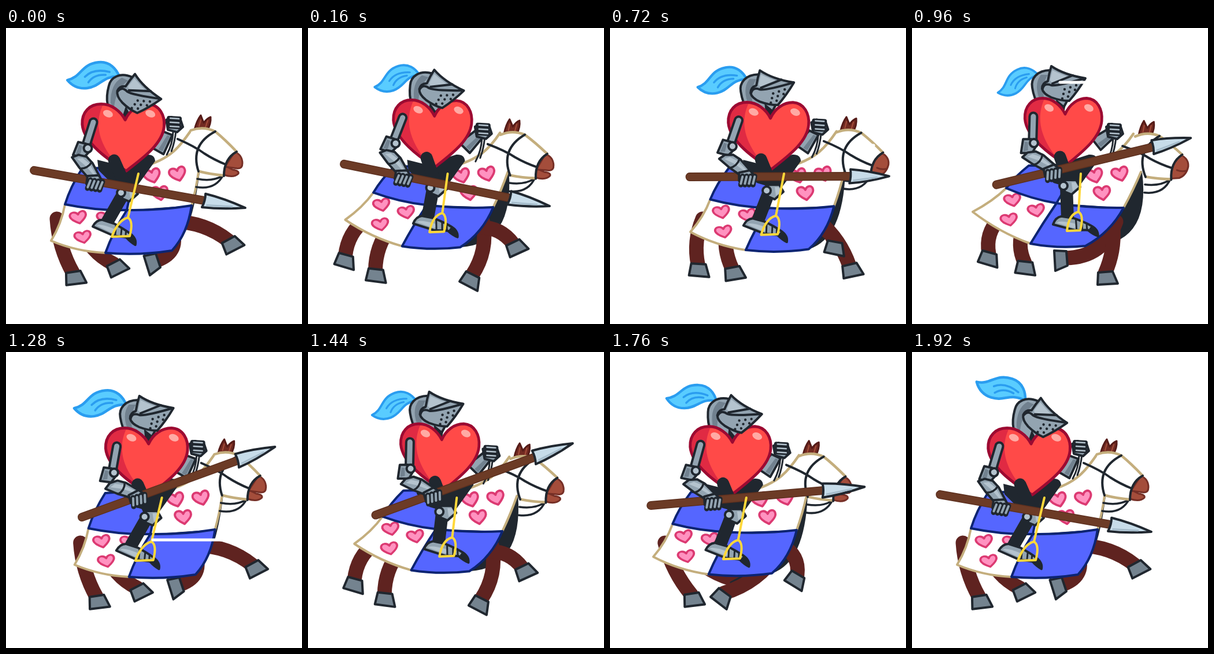
Recreate the animation shown at these times as an HTML page with a canvas. Size 512 by 512 pixels, loop 2 s.

```html
<!DOCTYPE html>
<html lang="en">
<head>
<meta charset="utf-8">
<title>Heart knight</title>
<style>
html, body { margin: 0; width: 100%; height: 100%; overflow: hidden; background: #fff; }
canvas { display: block; width: 100vw; height: 100vh; }
</style>
</head>
<body>
<canvas id="stage" width="512" height="512"></canvas>
<script>
const ctx = document.getElementById('stage').getContext('2d');
const STEP = 80, FRAMES = 25, STRIDE = 8;
const INK = '#20272f', STEEL = '#93a4b1', PALE = '#b4c3ce', SHADE = '#71818f';
const TAN = '#c4ae7d', BLUE = '#5566ff', NAVY = '#0c2472', BROWN = '#5f2320', HOOF = '#74838f';
const FACE = '#a44d3b', FACE_EDGE = '#762f26', GOLD = '#ffd83a';
const HEART = 'M0 0C8 -18 24 -28 40 -28C60 -27 70 -8 68 12C65 44 27 70 2 90' +
  'C-27 72 -72 42 -75 8C-76 -14 -62 -28 -42 -28C-24 -28 -8 -16 0 0Z';

const rad = d => d * Math.PI / 180;
const ramp = (a, b, t) => Math.min(1, Math.max(0, (t - a) / (b - a)));
const smooth = (a, b, t) => { const u = ramp(a, b, t); return u * u * (3 - 2 * u); };
const soft = (a, b, t) => (ramp(a, b, t) + smooth(a, b, t)) / 2;

// ---- motion: everything follows the stride, one lurch forward and the lance going up
function poseAt(t) {
  const w = 2 * Math.PI * t / STRIDE, c = Math.cos(w), s = Math.sin(w);
  const q = c - .45 * s;
  const lurch = Math.exp(-(((t - 5) / 2.2) ** 2));
  const lift = smooth(5, 15, t) - smooth(20, 24, t);
  const p = {
    t, c, s, q, lurch, lift,
    twice: Math.cos(2 * w) - Math.sin(2 * w),
    drift: 72 * (soft(0, 9, t) - soft(9.5, 24, t)),
    nod: 1 - smooth(0, 5, t) + smooth(20, 24, t),
    openMouth: t < 3 || t > 14
  };
  p.torso = { x: 204 + 2 * q + 20 * lurch, y: 154 + 5 * q + 5 * lurch };
  p.shoulder = { x: p.torso.x - 55, y: p.torso.y + 4 - 9 * lurch };
  p.hand = { x: 153 + 33 * lift - 10 * lurch, y: 262 + 3 * q - 14 * lift - 29 * lurch };
  p.elbow = joint(p.shoulder, p.hand, 46, 58);
  p.tilt = rad(10 - 30 * lift + 10 * lurch);
  p.helm = {
    x: 212 + 6 * q + 24 * lurch + 26 * p.nod,
    y: 82 + 5 * q + 10 * lurch + 14 * p.nod,
    turn: rad(24 * p.nod)
  };
  return p;
}
const wave = (p, a, b, d, k = 0) => a + b * p.c + d * p.s + k * p.twice;

// middle joint of two bones, bent to the left of a -> b
function joint(a, b, l1, l2) {
  const dx = b.x - a.x, dy = b.y - a.y, d = Math.hypot(dx, dy);
  const u = (l1 * l1 - l2 * l2 + d * d) / (2 * d), h = Math.sqrt(Math.max(0, l1 * l1 - u * u));
  return { x: a.x + (dx * u - dy * h) / d, y: a.y + (dy * u + dx * h) / d };
}

// ---- drawing helpers
function paint(fill, stroke, width = 4) {
  if (fill) { ctx.fillStyle = fill; ctx.fill(); }
  if (stroke) { ctx.strokeStyle = stroke; ctx.lineWidth = width; ctx.stroke(); }
}
function poly(p, fill, stroke, width) {
  ctx.beginPath();
  for (let i = 0; i < p.length; i += 2) ctx.lineTo(p[i], p[i + 1]);
  ctx.closePath();
  paint(fill, stroke, width);
}
function line(p, color, width) {
  ctx.beginPath();
  ctx.moveTo(p[0], p[1]);
  if (p.length === 4) ctx.lineTo(p[2], p[3]);
  else if (p.length === 6) ctx.quadraticCurveTo(...p.slice(2));
  else ctx.bezierCurveTo(...p.slice(2));
  paint(null, color, width);
}
function dot(x, y, r, fill, stroke, width) {
  ctx.beginPath();
  ctx.arc(x, y, r, 0, 7);
  paint(fill, stroke, width);
}
function shape(d, fill, stroke, width = 4) {
  const p = new Path2D(d);
  if (fill) { ctx.fillStyle = fill; ctx.fill(p); }
  if (stroke) { ctx.strokeStyle = stroke; ctx.lineWidth = width; ctx.stroke(p); }
}
function at(x, y, turn, draw) {
  ctx.save();
  ctx.translate(x, y);
  ctx.rotate(turn);
  draw();
  ctx.restore();
}
// outline through corners; bow[i] is added to the middle of the side that leaves corner i
function patch(corners, bows, fill, stroke, open = 0) {
  const n = corners.length;
  ctx.beginPath();
  ctx.moveTo(...corners[0]);
  for (let i = 0; i < n - open; i++) {
    const a = corners[i], b = corners[(i + 1) % n], [u, v] = bows[i] || [0, 0];
    ctx.quadraticCurveTo((a[0] + b[0]) / 2 + u, (a[1] + b[1]) / 2 + v, ...b);
  }
  paint(fill, stroke);
}

// ---- horse
function leg(rx, ry, x, y, turn, side) {
  const dx = x - rx, dy = y - ry, d = Math.hypot(dx, dy);
  const bend = side * (10 + .3 * Math.abs(turn));
  line([rx, ry, (rx + x) / 2 + dy / d * bend, (ry + y) / 2 - dx / d * bend, x, y], BROWN, 25);
  at(x, y, rad(turn), () => poly([-12, -1, 13, -3, 22, 18, -13, 20], HOOF, INK));
}
function legs(p) {
  leg(130, 345, wave(p, 159, 27, -55), wave(p, 407, 1, 12), wave(p, -6, -17, 17), -1);
  leg(88, 330, wave(p, 93, 23, -41), wave(p, 407, 17, -13), wave(p, 8, -12, 12), -1);
  leg(290, 335, wave(p, 294, 91, -23), wave(p, 395, -15, 21, -12), wave(p, 33, -57, -2), 1);
  leg(285, 345, wave(p, 266, -5, 76), wave(p, 404, -11, -22, 9), wave(p, 24, 38, -31, 14), 1);
}

function spot(x, y, turn, sy) {
  at(x, y, rad(turn), () => {
    ctx.scale(.195, .195 * sy);
    ctx.translate(3, -31);
    shape(HEART, '#ff92c0', '#dc3a72', 20);
  });
}

function body(p) {
  const { q } = p, sway = (x, y, u, v) => [x + u * q, y + v * q];
  const jaw = sway(333, 249, 0, 0), front = sway(312, 309, 9, -2);
  const frontLow = sway(262, 381, 25, 4), midLow = sway(157, 381, 15, 8);
  const rearLow = sway(60, 343, 18, 25), rearMid = sway(101, 291, 1, 14);
  const rump = sway(135, 241, -4, 3), core = sway(198, 309, 11, 6);
  const chest = sway(335, 367, -15, -12), poll = [320 - 2 * p.lurch, 180 - 3 * q];

  ctx.beginPath();
  ctx.moveTo(...jaw);
  ctx.quadraticCurveTo(...chest, frontLow[0], frontLow[1] - 2);
  ctx.lineTo(...core);
  paint(INK, INK);
  legs(p);

  const neck = [285, 228, 303, 205 - 3 * q, ...poll];
  ctx.beginPath();
  ctx.moveTo(...rump);
  ctx.lineTo(245, 237);
  ctx.bezierCurveTo(...neck);
  for (const v of [[poll[0] + 30, poll[1] + 30], jaw, front, core]) ctx.lineTo(...v);
  paint('#fff');
  line([235, 240, ...neck], TAN, 4.5);
  patch([jaw, front], [[2, 0]], null, TAN, 1);

  const seam = [(core[0] - midLow[0]) / 2 - 24, 0], hem = [-4, 8], tail = [6, 2];
  patch([core, midLow, rearLow, rearMid], [seam, hem, tail], '#fff');
  patch([midLow, rearLow, rearMid], [hem, tail], null, TAN, 1);
  spot(118 + 7 * q, 313 + 15 * q, -10, .88);
  spot(162 + 10 * q, 322 + 6 * q, -10, .88);
  spot(119 + 14 * q, 347 + 15 * q, -10, .85);

  patch([rearMid, rump, [225, 238], core], [[-5, 0], , , [0, 6]], BLUE, NAVY);
  patch([core, front, frontLow, midLow], [[0, 5], [10, 10], [0, 7], [-seam[0] - 24 + core[0] - midLow[0] - seam[0] * -1 - (core[0] - midLow[0]) + (core[0] - midLow[0]) / 2, 0]], BLUE, NAVY);
  spot(253, 256, -14, 1);
  spot(297, 253, -14, 1);
  spot(266, 286, -6, 1);
}

function face(p) {
  at(374 - 2 * p.q - 11 * p.lurch, 195.5 - 3.5 * p.q, rad(2 * p.q - 2), () => {
    ctx.translate(-372, -192);
    shape('M326 176Q330 160 337 151L342 164Q348 156 354 154Q355 166 348 177Z', '#722b22', '#551b18', 3);
    shape('M334 170L337 159M345 172L349 160', null, FACE, 2);
    shape('M374 256Q357 266 331 261M376 254Q362 281 329 275', null, INK, 3.5);
    if (p.openMouth) {
      shape('M378 238L392 245Q404 247 402 252Q394 260 377 254Z', FACE, FACE_EDGE, 3);
      shape('M396 214Q409 220 409 234Q409 243 401 243L379 240Z', FACE, FACE_EDGE, 3);
    } else {
      shape('M396 214Q410 222 408 235Q404 250 391 254L376 254L380 230Z', FACE, FACE_EDGE, 3);
      shape('M405 242Q396 244 388 240', null, FACE_EDGE, 3);
    }
    shape('M320 177Q341 169 362 179Q379 193 399 214Q380 226 376 256Q354 252 334 248L328 225Z', '#fff');
    shape('M320 177Q341 169 362 179Q379 193 399 214M376 255Q354 253 334 248', null, TAN, 4.5);
    shape('M362 179Q318 202 333 248M399 214Q377 226 377 256M297 192Q327 205 343 217Q360 228 380 236', null, INK, 4);
  });
}

// ---- rider
function plume(p) {
  const size = 83 + 7 * p.q;
  const turn = rad(10 * p.q - 14 + 18 * p.lurch + 25 * smooth(20, 24, p.t));
  at(-51, 4, turn - p.helm.turn, () => {
    ctx.scale(size / 100, size / 100);
    ctx.beginPath();
    ctx.moveTo(0, 0);
    ctx.bezierCurveTo(-4, -14, -16, -31, -38, -30);
    ctx.bezierCurveTo(-72, -29, -72, -4, -100, 0);
    ctx.bezierCurveTo(-92, 11, -80, 19, -63, 18);
    ctx.bezierCurveTo(-36, 16, -32, -4, 0, 0);
    paint('#59ccff', '#2a9df0', 5);
    line([-18, -10, -48, -20, -66, -4], '#2a9df0', 4);
    line([-26, -5, -48, -8, -60, 7], '#2a9df0', 4);
  });
}
// helmet parts are drawn around the middle of the visor
function inHelm(p, draw) {
  at(p.helm.x, p.helm.y, p.helm.turn, draw);
}
function dome() {
  shape('M-30 -4C-53 -4 -64 11 -61 26Q-58 45 -50 56L-13 72L0 48Z', STEEL, INK);
  shape('M-46 4Q-60 22 -46 52L-37 58Q-48 26 -34 4Z', SHADE);
  shape('M-20 46L-4 59L-6 72L-18 64Z', INK);
}
function visor() {
  shape('M-28 -11Q-32 2 -34 15Q-44 18 -44 28Q-42 37 -28 43Q-12 49 3 49Q18 32 31 10Q-6 4 -28 -11Z', STEEL, INK);
  shape('M-26 -4Q-12 3 0 7L-24 18Q-30 16 -30 13Z', PALE);
  shape('M-43 28Q-40 17 -28 22Q-18 24 30 10M-26 19L9 5', null, INK, 4);
  for (let i = 0; i < 8; i++) {
    const col = i % 3, row = Math.floor(i / 3);
    dot(-5 + col * 10 - row * 2, 29 - col * 3.5 + row * 8, 2.2, INK);
  }
}

function breast(p) {
  at(p.torso.x, p.torso.y, rad(5 * p.lurch), () => {
    ctx.scale(.96 + .03 * p.q, .98);
    ctx.save();
    ctx.clip(new Path2D(HEART));
    ctx.fillStyle = '#e02a43';
    ctx.fillRect(-90, -40, 180, 140);
    shape('M-35 -34C-66 20 -28 66 2 96L90 95L90 -40Z', '#ff4a48');
    ctx.restore();
    shape(HEART, null, '#9c0a32', 5);
    for (const x of [-30, 44]) {
      ctx.beginPath();
      ctx.ellipse(x, -11, 9, 6, .4, 0, 7);
      paint('#ffaaa4');
    }
  });
}

function reinArm(p) {
  const x = p.torso.x + 57 - 13 * p.lurch, y = p.torso.y + 48 + 16 * p.lurch;
  const hx = 288 + 2 * p.q + 14 * p.lurch, hy = 173 - 6 * p.q + 20 * p.lurch;
  line([hx + 4, hy + 10, hx + 2, hy + 30, hx - 4, hy + 46], INK, 3);
  line([hx - 1, hy + 12, hx - 2, hy + 34, hx - 12, hy + 52], INK, 3);
  at(x, y, Math.atan2(hy - y, hx - x), () => {
    poly([-6, -11, 28, -9, 32, 8, -4, 14], STEEL, INK);
    poly([-2, 2, 27, 1, 28, 6, -1, 10], SHADE);
  });
  at(hx, hy, 0, () => {
    poly([-13, -8, -4, -13, 12, -8, 16, 4, 6, 13, -10, 9], STEEL, INK);
    for (let v = -11; v < 5; v += 7) {
      line([-8, v, 10, v + 1], INK, 8);
      line([-6, v, 9, v + 1], PALE, 2.5);
    }
  });
}

function riderLeg({ q, lurch }) {
  const kx = 199, ky = 279 + 6 * q;
  const ax = 180 - 15 * q - 20 * lurch, ay = 336 + 3 * q - 16 * lurch;
  line([190 - 3 * q + 8 * lurch, 226 + 3 * q, kx + 9, ky - 8], INK, 21);
  line([kx + 5, ky, ax + 11, ay - 5], INK, 22);
  at(kx, ky, 0, () => {
    poly([2, -10, 22, -10, 29, 2, 14, 15, 2, 10], STEEL, INK);
    poly([14, -6, 21, -6, 25, 2, 16, 9], PALE);
    dot(0, 0, 7, PALE, INK);
  });
  at(ax, ay, Math.atan2(29 + 6 * q, 65), () => {
    shape('M-11 11Q-11 -2 -2 -7L19 -11Q38 -11 51 -9Q66 -7 69 4Q60 4 49 0L28 8Z', STEEL, INK);
    shape('M-6 6Q-3 0 24 -3L30 2L24 5Z', PALE);
    shape('M52 -8Q67 -6 69 4Q59 3 50 0Z', INK);
    shape('M24 -9L30 5M35 -9L40 3M44 -8L48 1', null, INK, 3);
  });
}

function upperArm({ shoulder: a, elbow: e }) {
  const upper = [a.x, a.y, e.x - 2, e.y - 8];
  line(upper, INK, 17);
  line(upper, STEEL, 9);
  at(e.x, e.y, Math.atan2(a.x - e.x, e.y - a.y) - rad(20), () => {
    poly([-27, 8, -15, -13, -2, -8, 2, 6, -9, 15], STEEL, INK);
    poly([-22, 7, -14, -8, -9, -5, -14, 8], SHADE);
    dot(0, 0, 7, PALE, INK);
  });
}

function foreArm({ elbow: e, hand: h, tilt }) {
  at(e.x, e.y, Math.atan2(h.y - e.y, h.x - e.x), () => {
    poly([10, 30, 8, 18, 14, 5, 27, -3, 54, -11, 51, 9, 30, 21], STEEL, INK);
    poly([14, 22, 15, 12, 26, 3, 48, -5, 48, -1, 30, 9], PALE);
    line([25, -2, 35, 8, 32, 20], INK, 3.5);
  });
  at(h.x, h.y, tilt * .8, () => {
    poly([-13, -7, 6, -11, 15, 0, 11, 8, -13, 7], STEEL, INK);
    for (let u = -10; u < 14; u += 7) {
      line([u + 3, -1, u, 14], INK, 9);
      line([u + 3, 0, u, 12], STEEL, 4);
    }
  });
}

function lance({ t, hand, tilt }) {
  at(hand.x, hand.y, tilt, () => {
    ctx.scale(1 - .07 * Math.sin(Math.PI * ramp(0, 20, t)), 1);
    line([-106, 0, 192, 0], '#5d301f', 15);
    line([-106, 0, 192, 0], '#6c3b26', 12);
    shape('M193 -12Q225 -10 265 0Q225 10 191 12Q195 0 193 -12Z', '#c7dce9', INK);
    line([199, 7, 242, 2], '#a5bccb', 3);
  });
}

function stirrup({ q, lurch }) {
  const x = 218 - 7 * q - 9 * lurch, y = 323 + 5 * q - 4 * lurch;
  ctx.beginPath();
  ctx.moveTo(229, 252);
  ctx.lineTo(x, y);
  ctx.quadraticCurveTo(x - 17, y + 4, x - 24 - 4 * q, y + 33);
  ctx.lineTo(x + 3, y + 32);
  ctx.quadraticCurveTo(x + 10, y + 6, x, y);
  paint(null, GOLD);
}

// ---- air
function dust(t) {
  const show = smooth(3, 5, t) - smooth(6, 8, t);
  if (show <= 0) return;
  const end = 100 + 33 * show;
  shape(`M89 380Q77 378 77 388Q78 397 99 399L${end} 400M64 407Q64 414 84 416L${end - 2} 419`, null, '#9db6c9', 4.5);
}
// time, left, right, height
const streaks = [[5, 135, 375, 291], [9, 436, 456, 203], [12, 256, 303, 94], [16, 254, 387, 325]];
function wind(now) {
  for (const [t, a, b, y] of streaks) {
    const shift = (now - t) * 130;
    if (Math.abs(now - t) <= 1) line([a - shift, y, b - shift, y], '#fff', 5);
  }
}

function draw(t) {
  const p = poseAt(t);
  ctx.fillStyle = '#fff';
  ctx.fillRect(0, 0, 512, 512);
  ctx.lineCap = ctx.lineJoin = 'round';
  dust(t);
  at(p.drift, 0, 0, () => {
    body(p);
    face(p);
    at(6 * p.lurch, 0, 0, () => shape('M158 228L190 236L243 219Q257 218 258 230L222 280L182 268L160 246Z', INK));
    inHelm(p, () => { plume(p); dome(); });
    reinArm(p);
    breast(p);
    inHelm(p, visor);
    riderLeg(p);
    upperArm(p);
    lance(p);
    foreArm(p);
    stirrup(p);
  });
  wind(t);
}

const start = performance.now();
function tick() {
  draw(Math.floor((performance.now() - start) / STEP) % FRAMES);
  requestAnimationFrame(tick);
}
tick();
</script>
</body>
</html>
```
